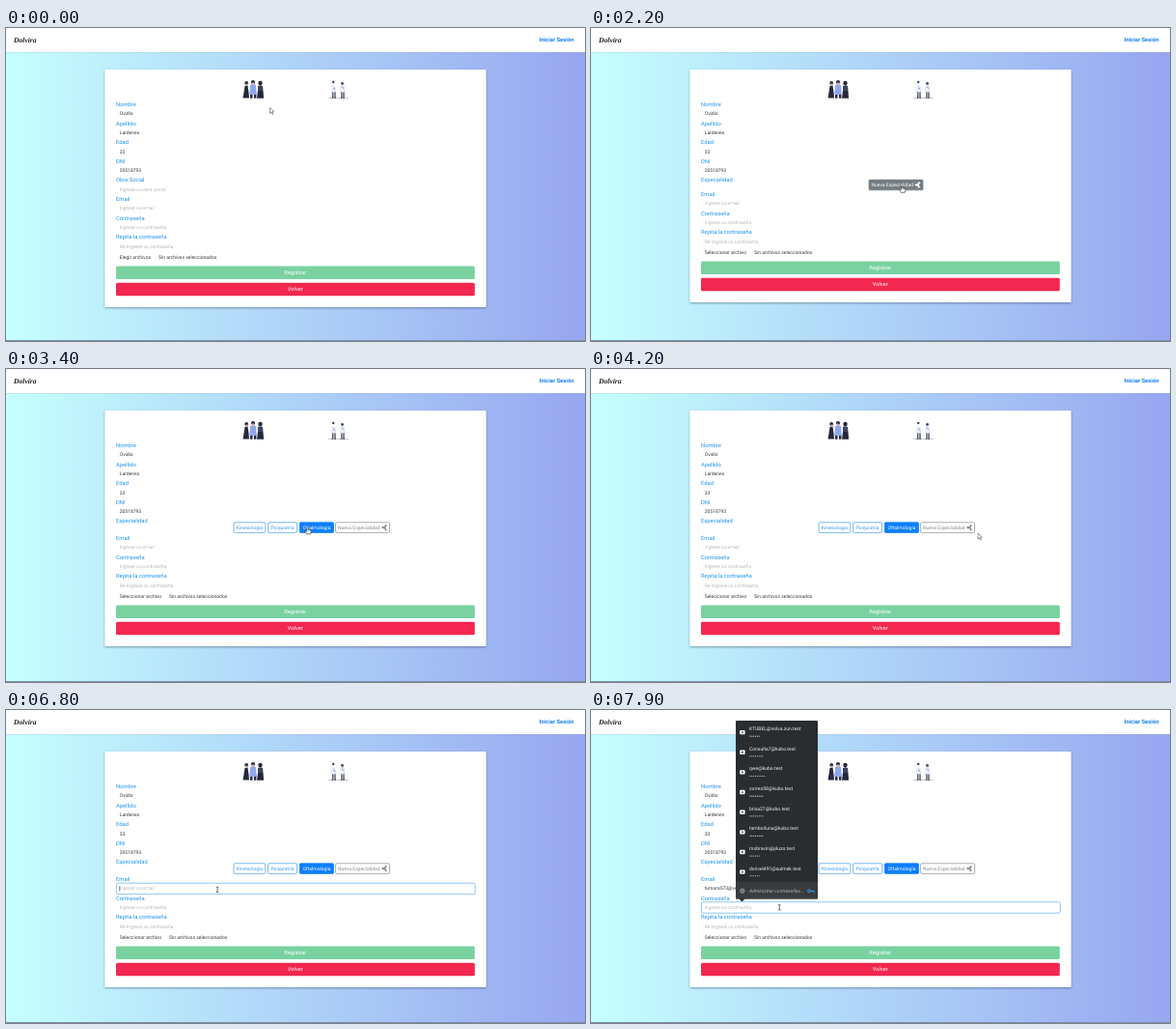
Recreate the animation shown at these times as an HTML page. Size 600 by 324 pixels, loop 8000 ms.

```html
<!DOCTYPE html>
<html lang="es">
<head>
<meta charset="utf-8">
<title>Registro</title>
<style>
html, body { margin: 0; width: 100%; height: 100%; overflow: hidden; }
svg { display: block; width: 600px; height: 324px; font-family: Roboto, sans-serif; text-rendering: geometricPrecision; }
.label { font-size: 5.8px; fill: #2196f3; }
.value { font-size: 5px; fill: #3a3a3a; }
.hint { font-size: 5px; fill: #999; font-weight: 300; }
.big { font-size: 5.7px; fill: #fff; text-anchor: middle; }
.chip { color: #3f9cee; font-size: 5px; }
.chip.gray { color: #858b90; }
.chip rect { fill: #fff; stroke: currentColor; stroke-width: .7; }
.chip text { fill: currentColor; text-anchor: middle; }
.chip .share { fill: currentColor; stroke: currentColor; stroke-width: .6; }
.chip.on rect { fill: #0d7ffb; stroke: #0d7ffb; }
.chip.gray.on rect { fill: #747d83; stroke: #747d83; }
.chip.on text { fill: #fff; }
.chip.on .share { fill: #fff; stroke: #fff; }
</style>
</head>
<body>
<svg id="stage" viewBox="0 0 600 324">
  <defs>
    <linearGradient id="sky"><stop stop-color="#c6ffff"/><stop offset="1" stop-color="#96a6f0"/></linearGradient>
    <filter id="shade" x="-5%" y="-5%" width="110%" height="112%">
      <feDropShadow dx="0" dy="1" stdDeviation="1.3" flood-color="#234" flood-opacity=".45"/>
    </filter>
  </defs>
  <rect width="600" height="324" fill="url(#sky)"/>
  <rect y="323" width="600" height="1" fill="#7c91a5"/>
  <rect width="600" height="25" fill="#fff"/>
  <rect y="25" width="600" height=".6" fill="#9ab" opacity=".4"/>
  <text x="8" y="15" font-family="Liberation Serif, serif" font-style="italic" font-weight="700" font-size="7.6" fill="#222">Dolvira</text>
  <text x="552.5" y="14.3" font-size="5.9" font-weight="700" fill="#1580f5">Iniciar Sesión</text>
  <rect id="card" x="102.5" y="43" width="395" height="246" rx="1" fill="#fff" filter="url(#shade)"/>

  <g id="patients">
    <g fill="#25283d">
      <path d="M247.5 60l3-.5 1 7 .5 6h-6.5l1-6z"/>
      <circle cx="249.2" cy="57" r="1.9"/>
      <circle cx="256" cy="56" r="2"/>
      <path d="M253 68h2.5v4.7H253zM257 68h2.4v4.7H257z"/>
      <circle cx="263.5" cy="57" r="2.2"/>
      <path d="M261 65h5.5l.6 7.7H260z"/>
    </g>
    <path d="M253 59.3q3-2 6 0l.9 9.7h-7.6z" fill="#8ea7ee"/>
    <path d="M255 56.5h2v2.3h-2zM248.6 57.5h1.8v1.8h-1.8z" fill="#d9a99b"/>
    <path d="M261 60q2.6-1.5 5 0l.5 5h-5.5z" fill="#3d4260"/>
  </g>
  <g id="doctors">
    <path d="M334 72.6h21" stroke="#8c93a8" stroke-width=".5"/>
    <path d="M338 60l2.7 0 1.2 6.5h-4.3zM347.2 59.5h3l.8 7h-4.4z" fill="#eef1fc" stroke="#b5bede" stroke-width=".4"/>
    <path d="M338.8 66.5v5.5M341 66.5v5.5M347.9 66.5v5.5M350 66.5v5.5" stroke="#25283d" stroke-width="1.1"/>
    <path d="M337.5 72.3h1.8M340.2 72.3h1.8M346.8 72.3h1.6M349.2 72.3h1.8" stroke="#25283d" stroke-width=".8"/>
    <circle cx="339.2" cy="56" r="1.2" fill="#39405f"/>
    <circle cx="348.5" cy="57.4" r="1.4" fill="#39405f"/>
    <path d="M339 62l2 1.3M348 61l2 1.5" stroke="#6c86e6" stroke-width=".9"/>
  </g>

  <g id="fixed"></g>
  <g id="insurance"></g>
  <g id="specialty"></g>
  <g id="lower">
    <rect id="ring" x="114.4" width="371.8" height="11.4" rx="1.4" fill="#fff" stroke="#7fc1f6" stroke-width=".9"/>
    <g id="fields"></g>
    <path id="caret" stroke="#222" stroke-width=".6"/>
    <rect x="114" y="246.5" width="371.8" height="13.5" rx="1.5" fill="#7ad2a1"/>
    <text class="big" x="299.7" y="255.2">Registrar</text>
    <rect x="114" y="263.7" width="371.8" height="13.5" rx="1.5" fill="#f3274f"/>
    <text class="big" x="299.7" y="272.4">Volver</text>
  </g>
  <g id="popup">
    <path d="M151 11h83q1 0 1 1v182.500q0 1-1 1h-74.500l-3 3-3-3H151q-1 0-1-1V12q0-1 1-1z" fill="#2a2d30"/>
    <path d="M150 178h85v16.500q0 1-1 1h-83q-1 0-1-1z" fill="#383c40"/>
    <circle cx="156.800" cy="187.300" r="2.100" fill="none" stroke="#c4c7ca" stroke-width=".8"/>
    <circle cx="156.800" cy="187.300" r=".8" fill="#c4c7ca"/>
    <text x="164" y="189.300" font-size="5" font-style="italic" fill="#b0b3b6">Administrar contraseñas...</text>
    <g fill="none" stroke="#3b9cf2" stroke-width="1"><circle cx="226" cy="187.300" r="1.400"/><path d="M227.500 187.300h3.700v1.500M229.500 187.300v1.300"/></g>
  </g>
  <g id="pointer">
    <path id="arrow" d="M0 0v6l1.400-1.300 1 2.200 1-.5-1-2.100h2z" fill="#fff" stroke="#333" stroke-width=".5"/>
    <path id="hand" d="M-.6.4q.7-.9 1.300 0v2.400l2.500.6q.8.300.6 1.200l-.6 2.700H-.8L-2.500 4.600q-.1-.9.700-.8l1.200.8z" fill="#fff" stroke="#222" stroke-width=".6"/>
    <path id="beam" d="M-1.200-2.600h2.400M0-2.600v5.200M-1.200 2.600h2.400" fill="none" stroke="#333" stroke-width=".7"/>
  </g>
</svg>
<script>
const $ = id => document.getElementById(id);
const add = (parent, tag, attrs, text = '') => {
  const el = document.createElementNS('http://www.w3.org/2000/svg', tag);
  for (const key in attrs) el.setAttribute(key, attrs[key]);
  el.textContent = text;
  parent.appendChild(el);
  return el;
};
const write = (parent, kind, x, y, text) => add(parent, 'text', { class: kind, x, y }, text);
const show = (el, on) => { el.style.display = on ? '' : 'none'; };
const field = (parent, y, label, text, kind = 'hint') => {
  write(parent, 'label', 114, y + 2, label);
  return write(parent, kind, 117.7, y + 11.4, text);
};

[['Nombre', 'Ovidio'], ['Apellido', 'Lardenes'], ['Edad', '33'], ['DNI', '20518793']]
  .forEach(([label, text], i) => field($('fixed'), 79 + i * 19.6, label, text, 'value'));
field($('insurance'), 157.4, 'Obra Social', 'Ingrese su obra social');
const email = field($('fields'), 177, 'Email', '');
field($('fields'), 196.600, 'Contraseña', 'Ingrese su contraseña');
field($('fields'), 216.200, 'Repita la contraseña', 'Re-Ingrese su contraseña');
const choose = write($('fields'), 'value', 117.7, 238.800, '');
const noFiles = write($('fields'), 'value', 158, 238.800, 'Sin archivos seleccionados');

write($('specialty'), 'label', 114, 159.400, 'Especialidad');
const chip = (parent, x, width, text, kind = '') => {
  const g = add(parent, 'g', { class: 'chip ' + kind, transform: `translate(${x} 158.5)` });
  add(g, 'rect', { x: .3, y: .3, width, height: 10.6, rx: 1.2 });
  add(g, 'text', { x: kind ? 24.500 : width / 2 + .3, y: 7.300 }, text);
  return g;
};
const row = add($('specialty'), 'g', {});
chip(row, 235.7, 32.800, 'Kinesiología');
chip(row, 271.300, 30, 'Psiquiatría');
const eyes = chip(row, 304, 35.300, 'Oftalmología');
const fresh = chip($('specialty'), 341.300, 56, 'Nueva Especialidad', 'gray');
add(fresh, 'path', { class: 'share', d: 'M52.300 3.700L49 5.600l3.300 2', fill: 'none' });
[[52.300, 3.600], [49, 5.600], [52.300, 7.700]].forEach(([cx, cy]) => add(fresh, 'circle', { class: 'share', cx, cy, r: .8 }));

[['KTUBEL@nolva.zun.test', 6], ['Consulta7@kubo.test', 8], ['qwe@kubo.test', 9], ['correo58@kubo.test', 8],
 ['brisa27@kubo.test', 8], ['tamborluna@kubo.test', 8], ['mobravin@pluzo.test', 6], ['dorivel491@sulmek.test', 6]]
  .forEach(([address, dots], i) => {
    const y = 19.300 + i * 20.650, g = $('popup');
    add(g, 'rect', { x: 154.200, y: y + 1.600, width: 5.400, height: 4.400, rx: .8, fill: '#fff' });
    add(g, 'circle', { cx: 156.900, cy: y + 3.800, r: .9, fill: '#2a2d30' });
    add(g, 'text', { x: 164, y: y + 1.800, 'font-size': 5, fill: '#f1f1f1' }, address);
    for (let n = 0; n < dots; n++) add(g, 'circle', { cx: 164.900 + n * 1.850, cy: y + 7.900, r: .6, fill: '#c9cbcd' });
  });

// time, x, y, pointer shape
const path = [
  [0, 273.5, 82.5, 'arrow'], [100, 284, 80, 'arrow'], [200, 304, 75, 'arrow'], [300, 324, 69, 'arrow'],
  [400, 340, 65, 'hand'], [600, 337, 66, 'hand'], [700, 338.5, 66, 'hand'],
  [1100, 341, 76, 'arrow'], [1200, 339, 98, 'arrow'], [1300, 336, 124, 'arrow'], [1400, 333, 147, 'arrow'],
  [1500, 330, 160, 'hand'], [1600, 328, 162, 'hand'], [1800, 323, 162.5, 'hand'], [2100, 322, 163, 'hand'],
  [2500, 347, 163, 'hand'], [2700, 361, 164, 'hand'], [2900, 338, 164, 'hand'], [3000, 322, 163.5, 'hand'],
  [3100, 313, 163, 'hand'], [3300, 311, 163.5, 'hand'], [3400, 312.5, 163.5, 'hand'],
  [3800, 319, 165, 'hand'], [3900, 338, 167, 'hand'], [4000, 363, 169, 'hand'], [4100, 389, 170, 'arrow'],
  [4200, 401, 170, 'arrow'], [6100, 484, 152, 'arrow'], [6200, 432, 173, 'arrow'], [6300, 361, 203, 'beam'],
  [6400, 290, 213, 'arrow'], [6500, 240, 198, 'arrow'], [6600, 219, 186, 'beam'],
  [7100, 216, 188, 'beam'], [7200, 206, 195, 'arrow'], [7300, 197, 204, 'beam'], [7400, 196, 205, 'beam'], [7700, 195.3, 204.3, 'beam']
];
const within = (t, from, to) => t >= from && t < to;

function draw(t) {
  const special = t >= 900, loaded = t >= 2300;
  const shift = loaded ? -2 : special ? -5 : 0;
  $('card').setAttribute('height', 246 + shift);
  $('lower').setAttribute('transform', `translate(0 ${shift})`);
  show($('insurance'), !special);
  show($('specialty'), special);
  show(row, loaded);
  fresh.setAttribute('transform', loaded ? 'translate(341.3 158.5)' : 'translate(287.7 156.8)');
  fresh.classList.toggle('on', within(t, 1500, 2300) || within(t, 2700, 2900));
  eyes.classList.toggle('on', within(t, 2300, 2500) || t >= 3000);
  choose.textContent = special ? 'Seleccionar archivo' : 'Elegir archivos';
  noFiles.setAttribute('x', special ? 169 : 158);

  const filled = t >= 7000, password = t >= 7400;
  email.textContent = filled ? 'tumora573@velino.test' : 'Ingrese su email';
  email.setAttribute('class', filled ? 'value' : 'hint');
  show($('ring'), t >= 6800);
  $('ring').setAttribute('y', password ? 200.800 : 181.200);
  show($('caret'), within(t, 6800, 7000) || within(t, 7400, 7700));
  $('caret').setAttribute('d', `M117.700 ${password ? 204 : 184.400}v5`);
  show($('popup'), t >= 7500);

  const [, x, y, shape] = path.findLast(step => step[0] <= t);
  $('pointer').setAttribute('transform', `translate(${x} ${y})`);
  for (const name of ['arrow', 'hand', 'beam']) show($(name), name === shape);
}

const start = performance.now();
function tick() {
  draw((performance.now() - start) % 8000);
  requestAnimationFrame(tick);
}
tick();
</script>
</body>
</html>
```
